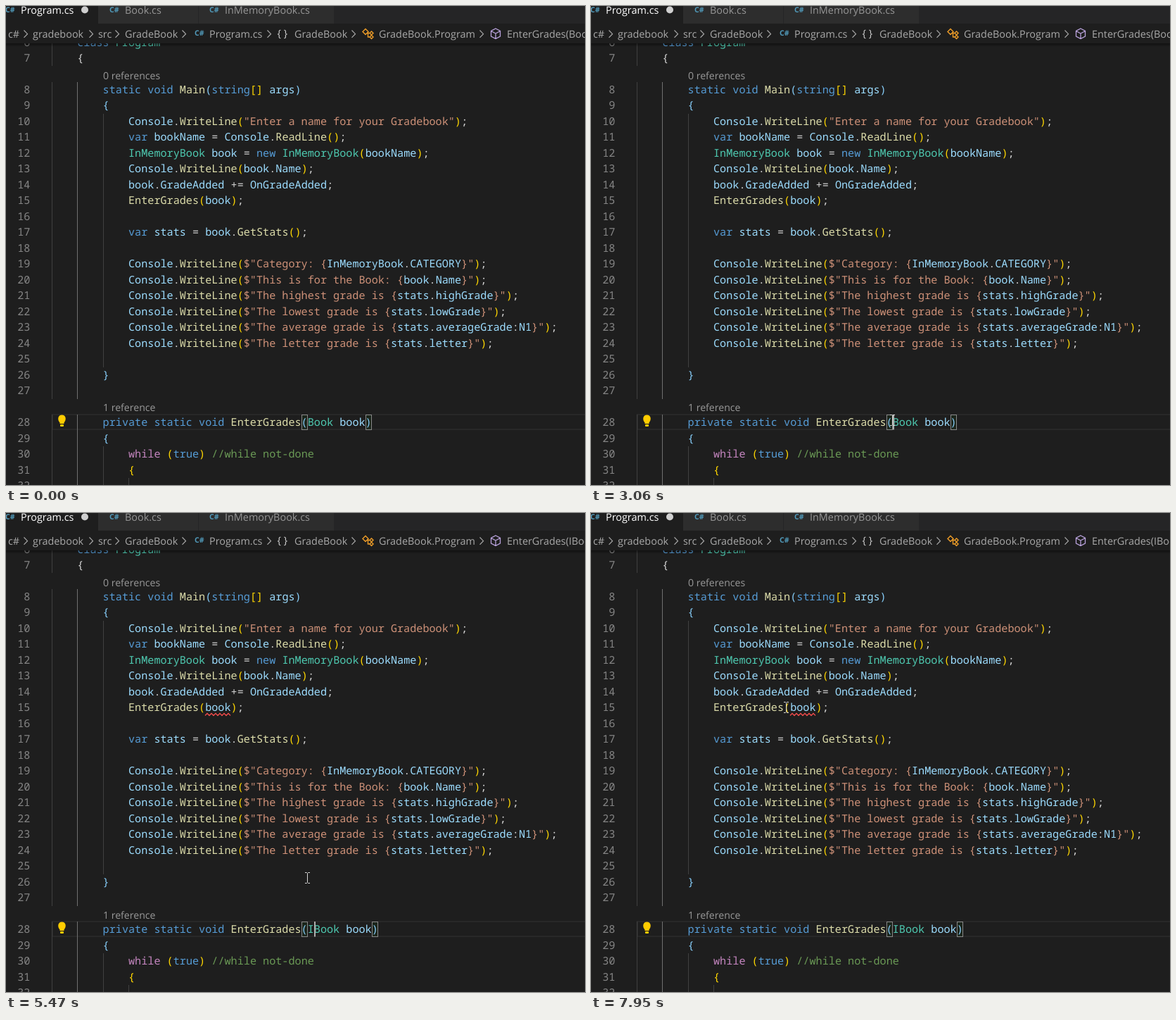
Recreate the animation shown at these times as an HTML page. Size 823x680 px, loop 8 s.

```html
<!DOCTYPE html>
<html lang="en">
<head>
<meta charset="utf-8">
<title>Editor session</title>
<style>
  html, body { margin: 0; width: 100%; height: 100%; overflow: hidden; background: #1e1e1e; }
  svg { display: block; width: 823px; height: 680px; }
  text { white-space: pre; text-rendering: geometricPrecision; }
  .code { font: 500 15.167px "Noto Sans Mono", monospace; }
  .ui { font: 14.4px "Open Sans", sans-serif; }
  .lens { font: 14.1px "Open Sans", sans-serif; }
  .lang { font: 700 10.5px "Open Sans", sans-serif; }
</style>
</head>
<body>
<svg id="stage" viewBox="0 0 823 680"></svg>
<script>
const LOOP = 8000, CH = 9.1, LEFT = 64.8;
const stage = document.getElementById('stage');
const ink = { key: '#569cd6', flow: '#c586c0', type: '#4ec9b0', call: '#dcdcaa',
  name: '#9cdcfe', str: '#ce9178', note: '#6a9955', plain: '#d4d4d4' };
const brackets = ['#ffd700', ink.plain, '#87cefa'];

function add(tag, attrs, parent = stage, content) {
  const el = document.createElementNS('http://www.w3.org/2000/svg', tag);
  for (const k in attrs) el.setAttribute(k, attrs[k]);
  if (content !== undefined) el.textContent = content;
  return parent.appendChild(el);
}
const rect = (x, y, width, height, fill, parent, more) =>
  add('rect', { x, y, width, height, fill, ...more }, parent);
const line = (d, stroke, width = 1) =>
  add('path', { d, stroke, fill: 'none', 'stroke-width': width });
const label = (x, y, str, fill, cls = 'ui', more) =>
  add('text', { x, y, fill, class: cls, ...more }, stage, str);
const show = (el, on) => el.setAttribute('visibility', on ? 'visible' : 'hidden');
const col = n => LEFT + n * CH;
const baseline = n => Math.round(n < 8 ? 79 + (n - 7) * 22.5
  : n < 28 ? 123.6 + (n - 8) * 22.5 : 596 + (n - 28) * 22.6);

// Syntax colouring; bracket colour follows nesting depth.
let depth = 1;
function tokens(src, nested = true) {
  const out = [];
  const re = /\/\/.*|\$?"[^"]*"|\w+|\s+|./g;
  for (let m; (m = re.exec(src));) {
    const s = m[0], next = src[re.lastIndex];
    let c = ink.plain;
    if (s.startsWith('//')) c = ink.note;
    else if (s.endsWith('"')) {
      for (const part of s.split(/(\{[^}]*\})/)) {
        if (part[0] !== '{') out.push([part, ink.str]);
        else out.push(['{', ink.str], ...tokens(part.slice(1, -1), false), ['}', ink.str]);
      }
      continue;
    }
    else if (/^(class|static|void|string|var|new|private|true|event)$/.test(s)) c = ink.key;
    else if (s === 'while') c = ink.flow;
    else if (/^(InMemoryBook|I?Book|Program|GradeAddedDelegate)$/.test(s) && next !== '.') c = ink.type;
    else if (/^\w/.test(s)) c = next === '(' ? ink.call : ink.name;
    else if (nested && /[([{]/.test(s)) c = brackets[depth++ % 3];
    else if (nested && /[)\]}]/.test(s)) c = brackets[--depth % 3];
    out.push([s, c]);
  }
  return out;
}
function code(x, y, src, parent, nested) {
  const body = src.trimStart();
  const el = add('text', { x: x + (src.length - body.length) * CH, y, class: 'code' }, parent);
  for (const [s, fill] of tokens(body, nested)) add('tspan', { fill }, el, s);
}

const source = `    class Program
    {
        static void Main(string[] args)
        {
            Console.WriteLine("Enter a name for your Gradebook");
            var bookName = Console.ReadLine();
            InMemoryBook book = new InMemoryBook(bookName);
            Console.WriteLine(book.Name);
            book.GradeAdded += OnGradeAdded;
            EnterGrades(book);

            var stats = book.GetStats();

            Console.WriteLine($"Category: {InMemoryBook.CATEGORY}");
            Console.WriteLine($"This is for the Book: {book.Name}");
            Console.WriteLine($"The highest grade is {stats.highGrade}");
            Console.WriteLine($"The lowest grade is {stats.lowGrade}");
            Console.WriteLine($"The average grade is {stats.averageGrade:N1}");
            Console.WriteLine($"The letter grade is {stats.letter}");

        }


        {
            while (true) //while not-done
            {
`.split('\n');

// Indent guides and current line
rect(66, 580, 780, 21, 'none', stage, { stroke: '#282828', 'stroke-width': 2 });
line('M65.5 53V85M65.5 108V558M65.5 580V680M138.5 153V513M138.5 625V680M174.5 670V680', '#404040');
line('M101.5 108V558M101.5 580V680', '#707070');

const hoverMark = rect(0, 0, 0, 22.5, 'rgba(38,79,120,.4)');

// The edited signature in both states
const signature = ['Book', 'IBook'].map(type => {
  const g = add('g', {});
  for (const c of [39, 45 + type.length])
    rect(Math.round(col(c)) + .5, 580.5, 8, 21, 'rgba(0,100,0,.1)', g, { stroke: '#888' });
  return { g, type };
});

source.forEach((src, i) => {
  const n = i + 6;
  label(34.4, baseline(n), n, '#858585', 'code', { 'text-anchor': 'end' });
  if (n !== 28) return code(LEFT, baseline(n), src);
  for (const s of signature)
    code(LEFT, baseline(n), `        private static void EnterGrades(${s.type} book)`, s.g);
});

label(138, 103.5, '0 references', '#999', 'lens');
const lens = label(138, 575, '1 reference', '#999', 'lens');

// Light bulb
add('path', { d: 'M76.5 591.5C72.5 587 74 580.5 79.5 580.5S86.5 587 82.5 591.5V593H76.5Z', fill: '#fc0' });
rect(77, 594, 5, 3, '#fc0', stage, { rx: 1 });

const squiggle = line('M283 287.5' + 'l3 -3l3 3'.repeat(6), '#f14c4c', 1.3);

// Header: tabs and breadcrumbs
const fade = add('linearGradient', { id: 'fade', x2: 0, y2: 1 }, add('defs', {}));
add('stop', { 'stop-color': '#000', 'stop-opacity': .45 }, fade);
add('stop', { offset: 1, 'stop-color': '#000', 'stop-opacity': 0 }, fade);
rect(0, 53, 823, 5, 'url(#fade)');
rect(0, 0, 823, 53, '#1e1e1e');
rect(131, 0, 692, 25, '#252526');
rect(131, 0, 142, 25, '#2d2d2d');
rect(274, 0, 192, 25, '#2d2d2d');

for (const [x, y] of [[-1, 9], [147, 9], [289, 9], [268, 41.5]]) label(x, y, 'C#', '#519aba', 'lang');
label(21, 11, 'Program.cs', '#fff');
label(169, 11, 'Book.cs', '#969696');
label(311, 11, 'InMemoryBook.cs', '#969696');
add('circle', { cx: 112, cy: 5.5, r: 5, fill: '#d0d0d0' });

const crumbs = [[3, 'c#', 28], [38, 'gradebook', 121], [131, 'src', 158], [169, 'GradeBook', 253],
  [289, 'Program.cs', 374], [410, 'GradeBook', 494], [530, 'GradeBook.Program', 676]];
for (const [x, str, arrow] of crumbs) {
  label(x, 44.5, str, '#a9a9a9');
  line(`M${arrow - 2.5} 34.5l5 5.2l-5 5.2`, '#a9a9a9', 1.2);
}
const crumb = label(712, 44.5, '', '#a9a9a9');
label(385.5, 44, '{ }', '#ccc');
// Class and method symbols
line('M507 36.5l4 -4l4 4l-4 4zM513 38.5H517M514.5 38.5V44H517M517 38.5l2.5 -2.5l2.5 2.5l-2.5 2.5zM517 44l2.5 -2.5l2.5 2.5l-2.5 2.5z', '#ee9d28', 1.4);
line('M696 32l6.5 3.5v7.5l-6.5 3.5l-6.5 -3.5v-7.5zM689.5 35.5l6.5 3.5l6.5 -3.5M696 39v7.5', '#b9a2dc', 1.3);

// Hover cards: start, full, end, column, top, word length, text
const hovers = [
  [810, 900, 2220, 45, 549, 4, 'Book book'],
  [2990, 3060, 3060, 28, 549, 11, 'void Program.EnterGrades(Book book)'],
  [3770, 3830, 4070, 40, 549, 4, 'GradeBook.Book'],
  [6310, 6400, 6700, 17, 212, 10, 'event GradeAddedDelegate InMemoryBook.GradeAdded']
].map(([start, full, end, c, top, len, str]) => {
  const g = add('g', {});
  rect(Math.round(col(c)) + .5, top + .5, str.length * CH + 20, 32, '#252526', g, { stroke: '#454545' });
  code(col(c) + 11, top + 22, str, g, false);
  return { g, start, full, end, x: col(c), y: top + 30, w: len * CH };
});

const caret = rect(0, 580, 2, 21.5, '#aeafad');
const beam = line('M-3.5 -7.5H-1L0 -6.5L1 -7.5H3.5M0 -6.5V6.5M-3.5 7.5H-1L0 6.5L1 7.5H3.5', '#d8d8d8', 1);

// Pointer moves: start, last step, step count, way points
const moves = [
  [120, 510, 6, [[610, 661], [570, 630], [520, 598], [493, 584]]],
  [2220, 2600, 6, [[493, 584], [465, 560], [435, 548], [427, 584]]],
  [2820, 2820, 1, [[427, 584], [428, 588]]],
  [3290, 3530, 4, [[428, 588], [438, 583]]],
  [5310, 5920, 9, [[438, 583], [449, 572], [385, 410], [302, 275], [296, 260]]],
  [6480, 6860, 6, [[296, 260], [298, 272], [295, 294]]],
  [6930, 7090, 3, [[295, 294], [296, 296]]],
  [7180, 7950, 11, [[296, 296], [300, 257], [284, 262], [277, 276]]]
];
function pointer(t) {
  const m = moves.filter(v => t >= v[0]).pop();
  if (!m) return null;
  const [start, last, count, path] = m;
  const step = count > 1 ? Math.min(count - 1, Math.floor((t - start) / (last - start) * (count - 1))) : 0;
  const u = (step + 1) / count * (path.length - 1);
  const i = Math.min(path.length - 2, Math.floor(u)), f = u - i;
  return path[i].map((v, k) => v + (path[i + 1][k] - v) * f);
}

const TYPED = 4070;
const caretOn = t => t >= TYPED ? Math.floor((t - TYPED) / 500) % 2 === 0 : t >= 3060 && t < 3530;

function draw(t) {
  const typed = t >= TYPED;
  show(signature[0].g, !typed);
  show(signature[1].g, typed);
  lens.setAttribute('y', t >= 4140 ? 576 : 575);
  crumb.textContent = `EnterGrades(${t >= 4520 ? 'IBook' : 'Book'} book)`;
  show(squiggle, t >= 5160);
  caret.setAttribute('x', Math.round(col(typed ? 41 : 40)));
  show(caret, caretOn(t));

  let mark = null;
  for (const h of hovers) {
    const on = t >= h.start && t < h.end;
    show(h.g, on);
    h.g.setAttribute('opacity', t < h.full ? .25 : 1);
    if (on) mark = h;
  }
  show(hoverMark, mark);
  if (mark) {
    hoverMark.setAttribute('x', mark.x);
    hoverMark.setAttribute('y', mark.y);
    hoverMark.setAttribute('width', mark.w);
  }

  const p = pointer(t);
  show(beam, p);
  if (p) beam.setAttribute('transform', `translate(${Math.round(p[0]) + .5} ${Math.round(p[1])})`);
}

const origin = performance.now();
function tick() {
  draw((performance.now() - origin) % LOOP);
  requestAnimationFrame(tick);
}
draw(0);
requestAnimationFrame(tick);
</script>
</body>
</html>
```
